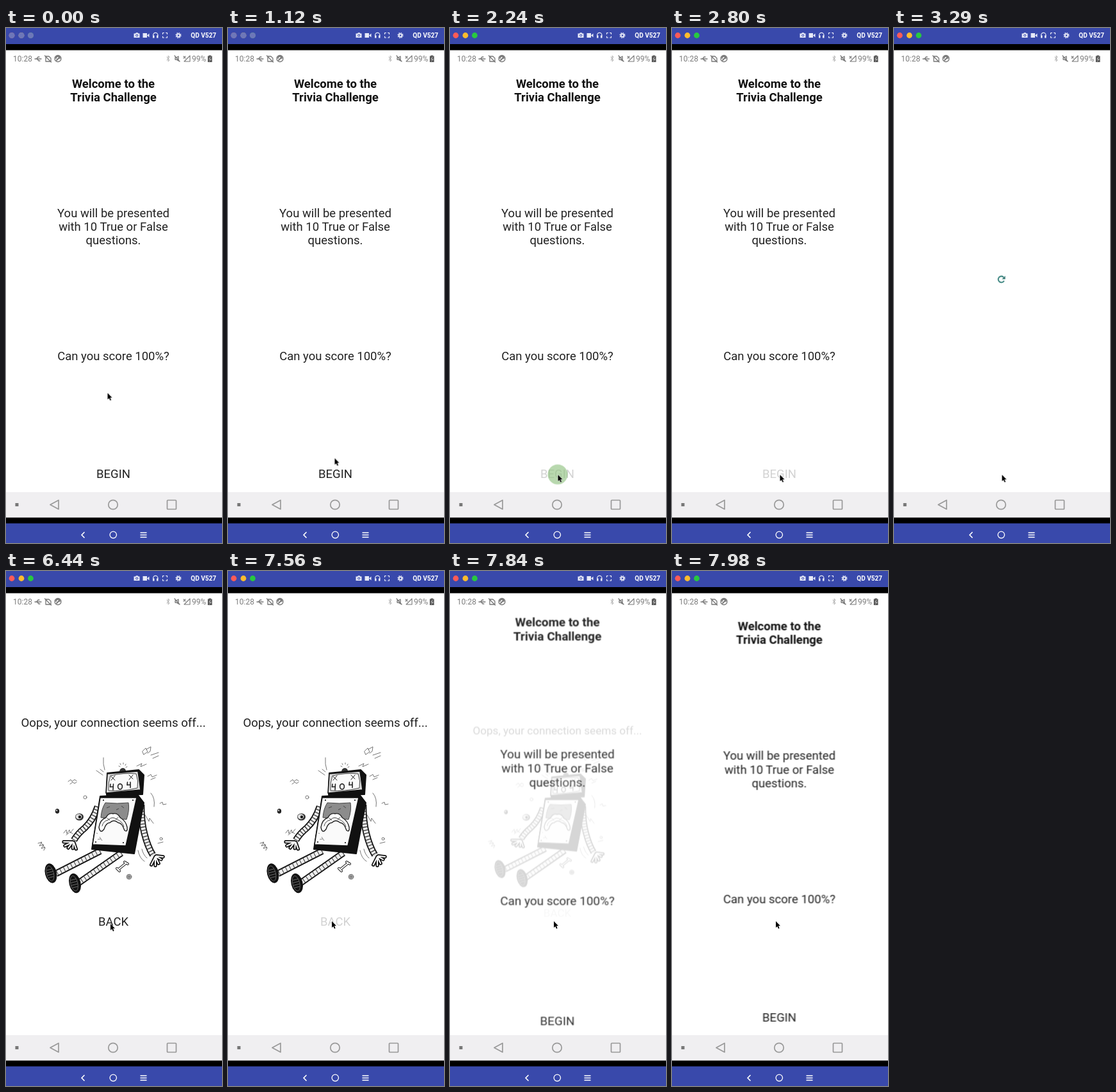
An HTML page for the animation above (8000 ms loop, 337 px wide and 800 px high).

```html
<!DOCTYPE html>
<html lang="en">
<head>
<meta charset="utf-8">
<title>Trivia Challenge</title>
<style>
html, body { margin: 0; width: 100%; height: 100%; overflow: hidden; background: #fff; }
svg { display: block; width: 100vw; height: 100vh; }
text { font-family: Roboto, Arial, sans-serif; font-size: 18.5px; fill: #222; text-anchor: middle; }
.title { font-weight: 700; fill: #111; }
.oops { font-size: 18.7px; }
.status text { font-size: 12px; fill: #7b7b7b; text-anchor: start; }
.device { font-size: 10px; font-weight: 700; fill: #fff; text-anchor: end; }
.line { fill: none; stroke-linecap: round; stroke-linejoin: round; }
.screen { transform-origin: 167.5px 390px; }

.screen, .anim { animation: 8s linear infinite; }
#intro { animation-name: intro; }
#loading { animation-name: loading; }
#error { animation-name: error; }
#spinner { animation-name: spin; transform-origin: 167.5px 390.5px; }
#begin { animation-name: begin; }
#back { animation-name: back; }
#idle { animation-name: idle; animation-timing-function: step-end; }
#touch { animation-name: touch; animation-timing-function: step-end; }
#cursor { animation-name: cursor; }

@keyframes intro {
  0%, 35.5% { opacity: 1; transform: scale(1); animation-timing-function: ease-out; }
  37.6%, 97.1% { opacity: 0; transform: scale(1.1); animation-timing-function: ease-out; }
  98.3% { opacity: 1; transform: scale(1.015); animation-timing-function: ease-out; }
  99.2%, 100% { opacity: 1; transform: scale(1.003); }
}
@keyframes loading {
  0%, 35.5% { opacity: 0; transform: scale(.88); animation-timing-function: ease-out; }
  37.6%, 45.5% { opacity: 1; transform: scale(1); animation-timing-function: ease-out; }
  47.2%, 100% { opacity: 0; transform: scale(1.1); }
}
@keyframes error {
  0%, 45.5% { opacity: 0; transform: scale(.9); animation-timing-function: ease-out; }
  48.1%, 97.1% { opacity: 1; transform: scale(1); animation-timing-function: ease-out; }
  98.5%, 100% { opacity: 0; transform: scale(.9); }
}
@keyframes spin {
  0%, 35% { transform: rotate(-130deg); }
  41.1%, 100% { transform: rotate(0deg); }
}
@keyframes begin {
  0%, 25.4% { opacity: 1; }
  27.2%, 60% { opacity: .2; }
  60.1%, 100% { opacity: 1; }
}
@keyframes back {
  0%, 89.2% { opacity: 1; }
  91.2%, 100% { opacity: .2; }
}
@keyframes idle {
  0% { opacity: 1; }
  20.1%, 100% { opacity: 0; }
}
@keyframes touch {
  0% { opacity: 0; transform: translate(168px, 693.5px); }
  25.4% { opacity: 1; transform: translate(168px, 693.5px); }
  30.6% { opacity: 0; transform: translate(162px, 544px); }
  89.2% { opacity: 1; transform: translate(162px, 544px); }
  92.7%, 100% { opacity: 0; transform: translate(162px, 544px); }
}
@keyframes cursor {
  0%, 3% { transform: translate(158.5px, 567px); animation-timing-function: ease-in-out; }
  19%, 73.5% { transform: translate(168.5px, 694px); animation-timing-function: ease-in-out; }
  80.3%, 86.6% { transform: translate(163px, 548px); }
  88.4%, 100% { transform: translate(162px, 544px); }
}
</style>
</head>
<body>
<svg viewBox="0 0 337 800" preserveAspectRatio="none">
  <defs>
    <path id="armL" d="M143 366Q136 387 123 399Q112 408 106 418"/>
    <path id="armR" d="M211 363Q211 390 216 408Q221 428 229 441"/>
    <path id="legL" d="M147 435L78 470"/>
    <path id="legR" d="M180 438L114 484"/>
    <path id="fingers" d="M0 0L-3 11M0 0L-9 10M0 0L-13 5M2 0L9 8M1 0L4 9"/>
    <g id="hand" class="line">
      <use href="#fingers" stroke="#111" stroke-width="5.4"/>
      <use href="#fingers" stroke="#fff" stroke-width="2"/>
    </g>
    <g id="foot">
      <ellipse rx="9" ry="15.5" fill="#111"/>
      <ellipse cx="-1.2" rx="5.5" ry="12" fill="none" stroke="#777" stroke-width=".7"/>
      <path d="M-5 -6H3M-6 -2H4M-6 2H4M-5 6H3" stroke="#777" stroke-width=".8"/>
    </g>
    <path id="bone" d="M176 463L187 454M173 462L177 466M185 452L190 455"/>
  </defs>

  <rect width="337" height="800" fill="#fff"/>

  <g id="intro" class="screen">
    <text class="title" x="167.5" y="93">Welcome to the</text>
    <text class="title" x="167.5" y="114.3">Trivia Challenge</text>
    <text x="167.5" y="293.5">You will be presented</text>
    <text x="167.5" y="315">with 10 True or False</text>
    <text x="167.5" y="336.4">questions.</text>
    <text x="167.5" y="515.8">Can you score 100%?</text>
    <text id="begin" class="anim" x="167.5" y="699">BEGIN</text>
  </g>

  <g id="loading" class="screen">
    <g id="spinner" class="anim">
      <path d="M171.3 393.4A4.8 4.8 0 1 1 170.6 386.8" class="line" stroke="#4c8f8a" stroke-width="2.2"/>
      <path d="M173.6 385V390.3H168.4Z" fill="#3f7d79"/>
    </g>
  </g>

  <g id="error" class="screen">
    <text class="oops" x="167.5" y="241.8">Oops, your connection seems off...</text>

    <!-- debris -->
    <g class="line" stroke="#666" stroke-width=".9">
      <path d="M213 280L218 275L221 281L215 285ZM219 277L226 273L225 280L221 283"/>
      <path d="M226 286L238 282M229 291L238 287M204 303L212 299L210 304L219 300"/>
      <path d="M152 290Q151 300 154 309M141 310L151 317M147 308L152 312"/>
      <path d="M97 327L101 324L103 327L107 324L110 326M100 331L104 328L107 330L110 328"/>
      <path d="M221 319L226 316L228 320L235 317M226 324L233 321M226 345Q233 353 231 366"/>
      <path d="M240 361L244 359L245 363L250 362M217 379L223 389L224 384L230 392"/>
      <path d="M90 407L94 402L95 408L99 402L100 407L105 401M94 410L98 407M101 406L104 408"/>
      <path d="M50 423L56 421L52 427L59 425L55 431L61 429L59 434M55 422L61 431"/>
      <path d="M206 434Q208 446 216 451M212 432Q214 441 220 446M237 423L245 421"/>
      <circle cx="123.5" cy="351.5" r="2.5"/>
      <circle cx="242" cy="416" r="2"/>
      <circle cx="192" cy="475" r="3.8" fill="#aaa"/>
      <path d="M190 475H194M192 473V477"/>
      <path d="M176 303L178 304M178 299L179 301M183 298V300M187 300L186 302M189 304L187 305"/>
    </g>
    <ellipse cx="80" cy="373" rx="3.2" ry="3.8" fill="#222"/>
    <circle cx="79" cy="372" r="1.3" fill="#bbb"/>
    <ellipse cx="114.5" cy="382" rx="6.5" ry="5.5" fill="#333"/>
    <ellipse cx="113.5" cy="381.5" rx="4.8" ry="4" fill="#ddd"/>
    <circle cx="115" cy="382" r="2.2" fill="#111"/>
    <g class="line">
      <use href="#bone" stroke="#222" stroke-width="4"/>
      <use href="#bone" stroke="#fff" stroke-width="2"/>
    </g>

    <!-- limbs -->
    <g fill="none">
      <g stroke="#111" stroke-width="10.5">
        <use href="#armL"/><use href="#armR"/><use href="#legL"/><use href="#legR"/>
      </g>
      <g stroke="#eee" stroke-width="7">
        <use href="#armL"/><use href="#armR"/><use href="#legL"/><use href="#legR"/>
      </g>
      <g stroke="#333" stroke-width="7.5" stroke-dasharray="1.3 3.6">
        <use href="#armL"/><use href="#armR"/>
      </g>
      <g stroke="#555" stroke-width="7.5" stroke-dasharray="1.2 5">
        <use href="#legL"/><use href="#legR"/>
      </g>
    </g>
    <use href="#hand" transform="translate(104 421) rotate(22)"/>
    <use href="#hand" transform="translate(233 444) rotate(-42)"/>
    <use href="#foot" transform="translate(70 469.5) rotate(-14)"/>
    <use href="#foot" transform="translate(107.5 485) rotate(-14)"/>

    <!-- body -->
    <g stroke-linejoin="round">
      <path d="M147 350L205 347L215 360L200 439L134 432Z" fill="#111" stroke="#111" stroke-width="2"/>
      <path d="M147 352L204 352L187 427L135 425Z" fill="#fafafa" stroke="#111" stroke-width="1.5"/>
      <path d="M155 360Q174 362 191 360Q193 372 188 386L148 383Q149 369 155 360Z" fill="#8c8c8c" stroke="#444"/>
      <path d="M157 368L162 366M172 371L176 369M180 365L184 368" stroke="#444"/>
      <path d="M145 398Q147 386 156 383Q160 375 167 377Q174 375 178 383Q187 388 189 398Q190 406 185 403Q181 391 175 391Q168 385 162 391Q156 391 153 401Q147 409 145 398Z" fill="#fff" stroke="#222" stroke-width="1.4"/>
      <path d="M150 396Q152 388 159 387Q166 380 173 386Q181 388 184 397M158 384L162 387M175 383L171 386" class="line" stroke="#444"/>
      <circle cx="152" cy="356" r="1"/><circle cx="198" cy="356" r="1"/>
      <circle cx="140" cy="421" r="1"/><circle cx="183" cy="422" r="1"/>
      <path d="M143 417L148 416M146 413L150 419M141 407L143 408" stroke="#888"/>
    </g>

    <!-- head -->
    <g stroke-linejoin="round">
      <path d="M177 311Q178 306 183 306Q187 307 187 311Z" fill="#333"/>
      <path d="M158 314L207 309L215 317L213 347L157 348Z" fill="#111" stroke="#111" stroke-width="2"/>
      <path d="M158 315L206 311L210 340L156 345Z" fill="#ddd" stroke="#111" stroke-width="1.6"/>
      <path d="M163 318Q183 313 203 315Q207 326 205 337Q181 343 160 341Q159 329 163 318Z" fill="#fafafa" stroke="#444"/>
      <g class="line" stroke="#222">
        <path d="M164 319L170 325M170 318L164 325M192 317L198 323M198 317L192 324"/>
        <path d="M163 331L162.5 335.5L167.500 335M167.500 331L167 340M189.500 328L189 332.500L194 332M194 328L194 336.500" stroke-width="1.6"/>
        <ellipse cx="178" cy="334.8" rx="3.4" ry="4.2" stroke-width="1.6"/>
      </g>
    </g>
    <text id="back" class="anim" x="167.5" y="550.5">BACK</text>
  </g>

  <!-- phone status bar -->
  <g class="status">
    <text x="11" y="52">10:28</text>
    <text x="290" y="52">99%</text>
    <g class="line" stroke="#777" stroke-width="1.3">
      <path d="M45 48H55M47.5 48L50 45H52M48.5 48L51 51H53"/>
      <path d="M62 44H67L70 47V52H62ZM60.5 43L70.5 53"/>
      <circle cx="81" cy="47.5" r="5"/>
      <path d="M78 47A3 3 0 0 1 84 47M79 50L83 46" stroke-width="1.8"/>
      <path d="M251 45L255 50L253 52V43L255 45L251 50" stroke="#aaa" stroke-width=".9"/>
      <path d="M264 46H266L269 44V51L266 49H264ZM263 43L271 52"/>
      <path d="M278 52L287 43V52ZM277 44L280 47M280 44L277 47" stroke-width="1.1"/>
    </g>
    <path d="M314.8 43.5H316.5V42.5H319.8V43.5H321.5V53H314.8Z" fill="#555"/>
    <path d="M319 45L317 48.5H320L317.5 51.5" class="line" stroke="#ddd" stroke-width=".8"/>
  </g>

  <!-- phone navigation bar -->
  <rect y="721" width="337" height="40" fill="#f0eff1"/>
  <rect x="14.5" y="738" width="5" height="5" fill="#777"/>
  <g class="line" stroke="#999" stroke-width="1.7">
    <path d="M69 740.5L82 733.5V747.5Z"/>
    <circle cx="167" cy="740.5" r="7.2"/>
    <rect x="251.5" y="733.5" width="14" height="14" rx="1"/>
  </g>

  <!-- window frame -->
  <path d="M0 25H337V34.5H0ZM0 760.5H337V770H0Z" fill="#000"/>
  <path d="M0 0H337V25H0ZM0 769.5H337V800H0Z" fill="#3949ab"/>
  <circle cx="9" cy="11.5" r="4.4" fill="#fc5b57"/>
  <circle cx="24" cy="11.5" r="4.4" fill="#fdbc2e"/>
  <circle cx="38.5" cy="11.5" r="4.4" fill="#28c840"/>
  <g id="idle" class="anim" fill="#6d77b9">
    <circle cx="9" cy="11.5" r="4.6"/>
    <circle cx="24" cy="11.5" r="4.6"/>
    <circle cx="38.5" cy="11.5" r="4.6"/>
  </g>
  <g fill="#e6e9f7">
    <path d="M199.5 8.5H202L203 7.3H205.5L206.5 8.5H208.5V15H199.5Z"/>
    <circle cx="204.2" cy="11.6" r="2" fill="#3949ab"/>
    <circle cx="204.2" cy="11.6" r="1.1"/>
    <path d="M213.5 8H220V15H213.5ZM220 11.5L223.5 8.5V14.5Z"/>
    <path d="M229 11.5H231.5V15.5H229ZM235 11.5H237.5V15.5H235Z"/>
  </g>
  <g class="line" stroke="#e6e9f7" stroke-width="1.2">
    <path d="M229.6 12V11A3.6 3.6 0 0 1 236.9 11V12"/>
    <path d="M244.5 9.5V7.5H246.5M249.5 7.5H251.5V9.5M251.5 13V15H249.5M246.5 15H244.5V13"/>
    <circle cx="269" cy="11.5" r="2.3" stroke-width="1.9"/>
    <circle cx="269" cy="11.5" r="3.9" stroke-width="1.4" stroke-linecap="butt" stroke-dasharray="1.6 1.463"/>
  </g>
  <text class="device" x="328" y="15">QD V527</text>
  <g class="line" stroke="#fff" stroke-width="1.7">
    <path d="M122 783.5L118 787.5L122 791.5"/>
    <circle cx="167.3" cy="787.3" r="5.2" stroke-width="1.3"/>
    <path d="M210 784H219M210 787.5H219M210 791H219" stroke-width="1.5"/>
  </g>

  <g id="touch" class="anim"><circle r="15.5" fill="#8dc07c" opacity=".62"/></g>
  <g id="cursor" class="anim">
    <path d="M0 0V10L2.3 8L4 11.7L5.6 11L4 7.3H7Z" fill="#000" stroke="#fff" stroke-width=".9" paint-order="stroke"/>
  </g>
</svg>
</body>
</html>
```
